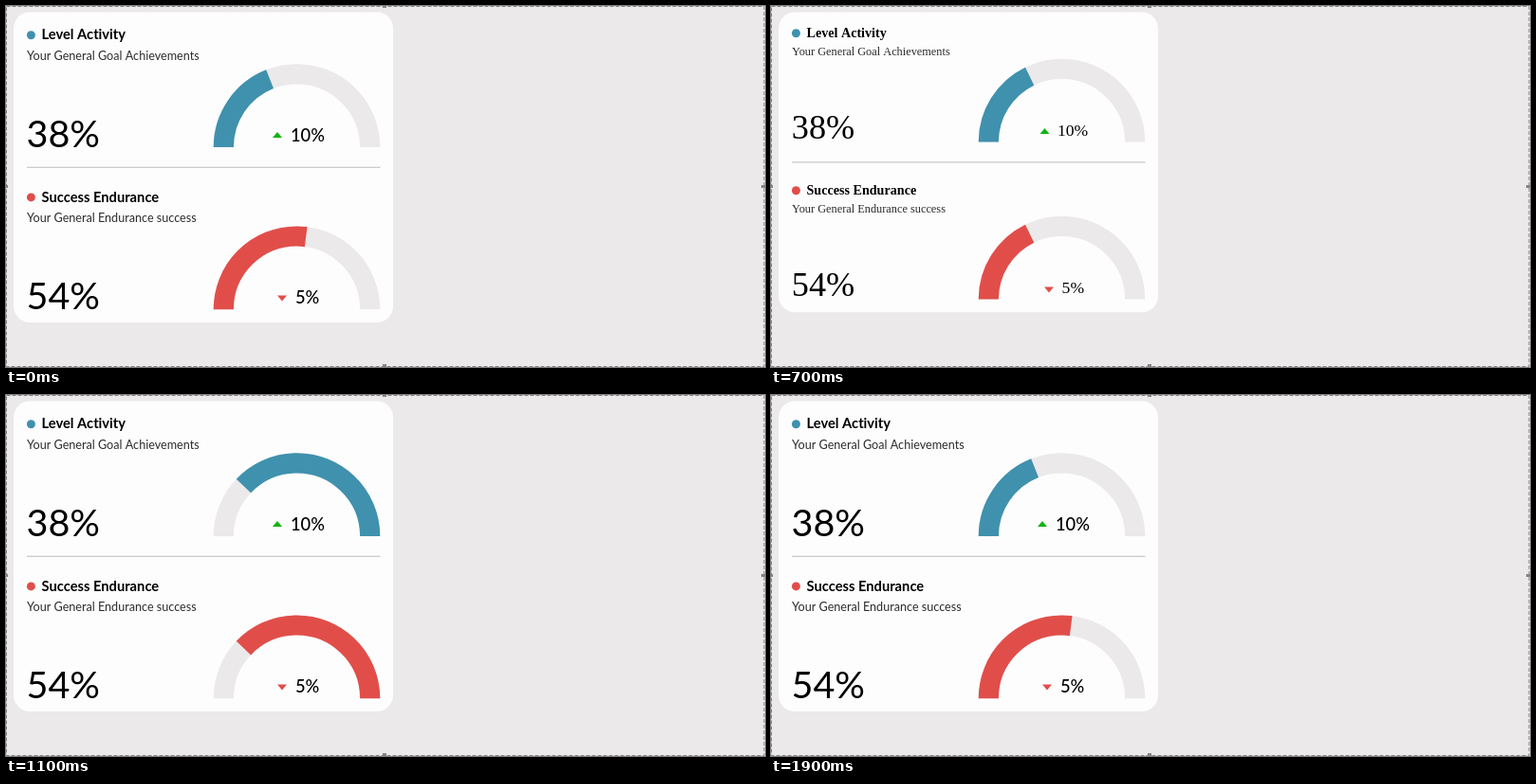
An HTML page with a canvas for the animation above (2100 ms loop, 800 by 381 pixels).

```html
<!DOCTYPE html>
<html lang="en">
<head>
<meta charset="utf-8">
<title>Gauge card</title>
<style>
html, body { margin: 0; width: 100%; height: 100%; overflow: hidden; background: #ebe9ea; }
canvas { display: block; width: 800px; height: 381px; }
</style>
</head>
<body>
<canvas id="stage" width="800" height="381"></canvas>
<script>
const ctx = document.getElementById('stage').getContext('2d');
const LOOP = 2100, STEP = 100;
const GREY = '#ebe9ea', BLUE = '#3f91ad', RED = '#e14e4a', GREEN = '#10b410';

// Vertical positions belong to the first section; the second lies `gap` lower.
const sansLook = {
  family: 'Lato, "Open Sans", sans-serif',
  title: 14.7, sub: 12.6, big: 39.5, small: 18.3,
  dotY: 30.7, titleY: 35.3, subY: 57, bigY: 149, bigX: 21.5, smallY: 142.5,
  ringY: 149, triY: 136, gap: 171.2, lineY: 170, bottom: 334,
  triX: [286, 291], smallX: [300, 305]
};
const serifLook = {
  family: '"Liberation Serif", "Times New Roman", serif',
  title: 14.1, sub: 12.3, big: 36.2, small: 17.6,
  dotY: 28.7, titleY: 32.7, subY: 51.7, bigY: 139.7, bigX: 21.8, smallY: 137.2,
  ringY: 143.6, triY: 132, gap: 166, lineY: 164.6, bottom: 323.3,
  triX: [288.5, 293], smallX: [302, 306.6]
};

const sections = [
  { title: 'Level Activity', sub: 'Your General Goal Achievements', value: 38,
    change: '10%', color: BLUE, triColor: GREEN, up: true },
  { title: 'Success Endurance', sub: 'Your General Endurance success', value: 54,
    change: '5%', color: RED, triColor: RED, up: false }
];

// Degrees turned by the half ring: up past the half turn, then back to its value.
function turn(t, value) {
  const end = value * 1.8;
  if (t < 600) return end;
  const keys = [[550, 0], [700, 64], [800, 95], [1120, 232], [1655, end]];
  for (let i = 1; i < keys.length; i++) {
    const [t0, a0] = keys[i - 1], [t1, a1] = keys[i];
    if (t <= t1) return a0 + (a1 - a0) * (t - t0) / (t1 - t0);
  }
  return end;
}

function text(str, x, y, size, family, color = '#000', weight = 400) {
  ctx.font = `${weight} ${size}px ${family}`;
  ctx.fillStyle = color;
  ctx.fillText(str, x, y);
}

function arc(y, from, to, color) {
  const rad = a => Math.PI * (1 + a / 180);
  ctx.beginPath();
  ctx.arc(306.5, y, 77.2, rad(from), rad(to));
  ctx.lineWidth = 21.2;
  ctx.strokeStyle = color;
  ctx.stroke();
}

function triangle(x, y, up, color) {
  const h = up ? 3 : -3;
  ctx.beginPath();
  ctx.moveTo(x - 5, y + h);
  ctx.lineTo(x + 5, y + h);
  ctx.lineTo(x, y - h);
  ctx.fillStyle = color;
  ctx.fill();
}

function drawSection(s, i, look, t, showText) {
  const dy = i * look.gap;
  ctx.beginPath();
  ctx.arc(26.4, look.dotY + dy, 4.5, 0, Math.PI * 2);
  ctx.fillStyle = s.color;
  ctx.fill();

  const angle = turn(t, s.value);
  arc(look.ringY + dy, 0, 180, GREY);
  arc(look.ringY + dy, Math.max(0, angle - 180), Math.min(180, angle), s.color);
  triangle(look.triX[i], look.triY + dy + (s.up ? 0 : 1.4), s.up, s.triColor);

  if (!showText) return;
  const f = look.family;
  text(s.title, 37.5, look.titleY + dy, look.title, f, '#000', 700);
  text(s.sub, 22, look.subY + dy, look.sub, f, '#2c2c2e');
  text(s.value + '%', look.bigX, look.bigY + dy, look.big, f);
  text(s.change, look.smallX[i], look.smallY + dy, look.small, f, '#000', 500);
}

// Dashed selection outline with a handle on each side.
function drawOutline() {
  ctx.strokeStyle = '#858384';
  ctx.lineWidth = 1;
  ctx.setLineDash([4, 2]);
  ctx.strokeRect(0.5, 0.5, 798.5, 380);
  ctx.setLineDash([]);
  ctx.fillStyle = '#858384';
  for (const [x, y] of [[399, 0], [399, 379], [0, 190], [798, 190]]) {
    ctx.fillRect(x - 2, y - 1, 4, 3);
  }
}

function draw(t) {
  const look = t === 600 || t === 700 ? serifLook : sansLook;
  ctx.fillStyle = GREY;
  ctx.fillRect(0, 0, 800, 381);
  ctx.beginPath();
  ctx.roundRect(8, 6.5, 400, look.bottom - 6.5, 17);
  ctx.fillStyle = '#fdfdfe';
  ctx.fill();
  ctx.fillStyle = '#c8c6c7';
  ctx.fillRect(22, look.lineY - 0.3, 372.5, 1.2);
  // The text is blank for one step while the fonts reload.
  sections.forEach((s, i) => drawSection(s, i, look, t, t !== 600));
  drawOutline();
}

// Any letter spacing keeps "ti" from joining into a ligature.
ctx.letterSpacing = '0.01px';

const start = performance.now();
function tick() {
  const t = (performance.now() - start) % LOOP;
  draw(Math.floor(t / STEP) * STEP);
  requestAnimationFrame(tick);
}
tick();
</script>
</body>
</html>
```
